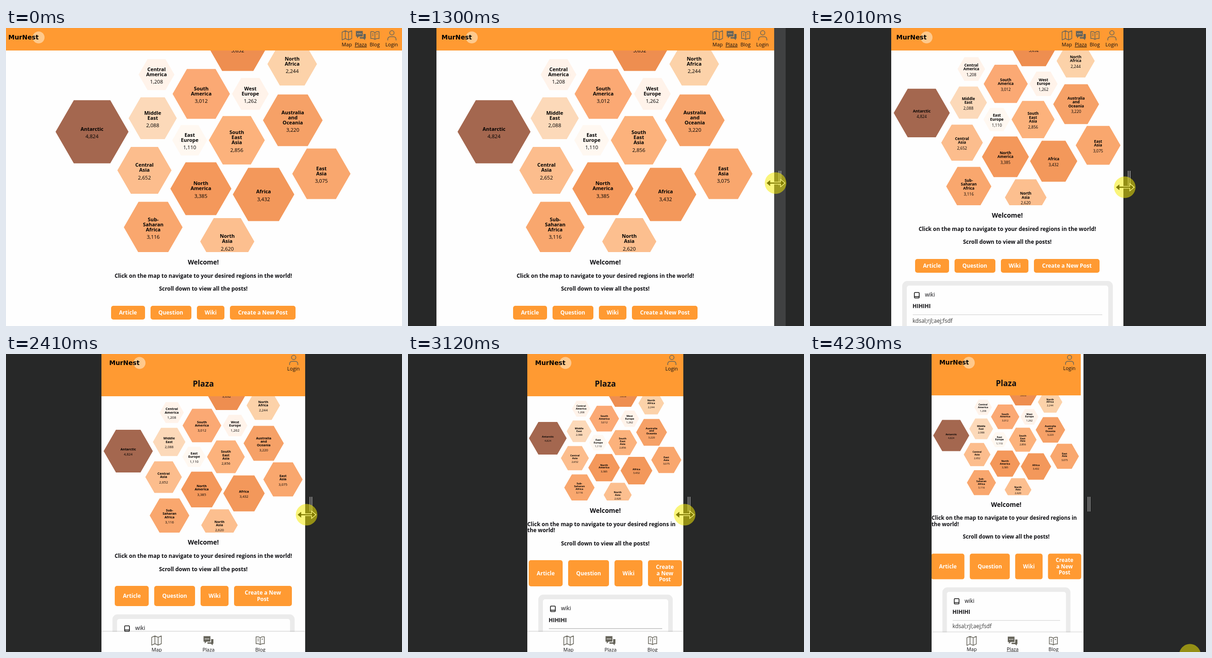
Recreate the animation shown at these times as an HTML page. Size 863 by 649 pixels, loop 4.33 s.

```html
<!DOCTYPE html>
<html lang="en">
<head>
<meta charset="utf-8">
<title>Responsive page resize</title>
<style>
  html, body { margin: 0; width: 100%; height: 100%; overflow: hidden; background: #272828; }
  #stage { position: relative; width: 863px; height: 649px; overflow: hidden; background: #272828;
    font: 12px/13.5px "Open Sans", "Noto Sans", sans-serif; color: #0c0c10; }
  #page { position: absolute; top: 0; height: 649px; overflow: hidden; background: #fefefe; }
  #view { position: absolute; left: 0; top: 0; transform-origin: 0 0; }
  header { position: absolute; left: 0; top: 0; width: 100%; background: #ff9a32; --dots: #ffb56a; }
  .logo { position: absolute; overflow: visible; }
  .logo text { font: bold 13.8px "DejaVu Sans", sans-serif; }
  .title { position: absolute; top: 52px; width: 100%; text-align: center; font-weight: 700; font-size: 17.5px; line-height: 24px; }
  .item { position: absolute; width: 40px; margin-left: -20px; text-align: center; font-size: 10.8px; line-height: 14px; }
  .item svg { display: block; margin: 0 auto .5px; fill: none; stroke: #66645a; stroke-width: 1.5; stroke-linejoin: round; }
  .item .solid { fill: #66645a; stroke: none; }
  .item .dots { fill: var(--dots); stroke: none; }
  .item u { text-underline-offset: 1px; }
  #map { position: absolute; left: 0; overflow: hidden; }
  #map text { text-anchor: middle; font-size: 11.2px; }
  #map .name { font-weight: 700; font-size: 10.9px; }
  #content { position: absolute; left: 0; width: 100%; display: flex; flex-direction: column; align-items: center; }
  #content p { margin: 0; font-weight: 700; font-size: 11.88px; }
  #content .welcome { font-size: 14px; line-height: 20px; margin: 11.5px 0 13px; }
  .buttons { width: 100%; box-sizing: border-box; padding: 0 29.25px; margin-top: 30px;
    display: flex; justify-content: center; gap: 12px; }
  .buttons div { display: grid; place-items: center; text-align: center; padding: 8.25px 17.4px; border-radius: 5px;
    background: #ff9a32; color: #fff; font-weight: 700; font-size: 11.88px; }
  .card { align-self: stretch; margin: 18px 23.5px 0; border: 11.5px solid #ebebeb; border-radius: 11px;
    height: 200px; position: relative; }
  .card::before { content: ""; position: absolute; inset: -1px; border-radius: 5px; background: #fefefe; box-shadow: 0 0 0 5px #ebebeb; }
  .card > * { position: absolute; left: 12px; white-space: nowrap; }
  .card hr { right: 12px; top: 62px; margin: 0; border: 0; height: 1.5px; background: #ccc; }
  #tabs { position: absolute; left: 0; bottom: 0; height: 44px; background: #fefefe; box-shadow: 0 -1px 3px #0003; --dots: #fff; }
  #over { position: absolute; left: 0; top: 0; }
</style>
</head>
<body>
<div id="stage">
  <div id="page"><div id="view">
    <svg id="map"><g id="cells"></g></svg>
    <div id="content">
      <p class="welcome">Welcome!</p>
      <p>Click on the map to navigate to your desired regions in the world!</p>
      <p style="margin-top:15px">Scroll down to view all the posts!</p>
      <div class="buttons"><div>Article</div><div>Question</div><div>Wiki</div><div>Create a New Post</div></div>
      <div class="card">
        <svg style="left:14px;top:13px" width="14" height="14" fill="none" stroke="#111" stroke-width="1.6">
          <rect x="1.5" y="1" width="10.5" height="12" rx="1.5"/><path d="M2 10h10"/></svg>
        <span style="left:39px;top:12px">wiki</span>
        <b style="top:37.5px">HIHIHI</b>
        <hr>
        <span style="top:69px;color:#333">kdsal;rjl;aej;fsdf</span>
      </div>
    </div>
    <header>
      <svg class="logo" width="90" height="40"><circle cx="66" cy="20.5" r="13" fill="#ffc98c"/><text y="25">MurNest</text></svg>
      <div class="title">Plaza</div>
    </header>
    <div id="tabs"></div>
  </div></div>
  <svg id="over" width="863" height="649">
    <g id="handle">
      <rect id="strip" width="25" height="649" fill="#404142"/>
      <path d="M10.5 311v32M14.5 311v32" stroke="#a9a9a9" stroke-width="1.6"/>
    </g>
    <g id="cursor">
      <path id="resize" d="M-20.5 0l9.5-8v6h22v-6l9.5 8-9.5 8v-6h-22v6z" fill="#000" stroke="#fff" stroke-width="1.4"/>
      <path id="pointer" d="M0 0v17l4-4 3 7 3-1-3-7h6z" fill="#fff" stroke="#000"/>
      <circle id="glow" r="23.5" fill="#f8ee04" fill-opacity=".52"/>
    </g>
  </svg>
</div>
<script>
const $ = id => document.getElementById(id);
const LOOP = 4330, HEIGHT = 649, CENTER = 430;
const BREAKPOINT = 500, MAP_WIDTH = 658, MIN_WIDTH = 338;

// name, post count, centre x, centre y, width, fill
const REGIONS = [
  ["Antarctic", "4,824", -242.5, 177, 159, "#a4674f"],
  ["Central/America", "1,208", -102, 52.5, 78, "#fff3ea"],
  ["South/America", "3,012", -4.5, 94.5, 125, "#fba974"],
  ["West/Europe", "1,262", 102.5, 94.5, 80, "#fff3ea"],
  ["North/Africa", "2,244", 193.7, 29.5, 108, "#fcd2a9"],
  ["", "3,632", 75, -14.5, 136, "#ee8e50"],
  ["Middle/East", "2,088", -110.3, 147.5, 105, "#fcd9b9"],
  ["Australia/and/Oceania", "3,220", 195, 152, 130, "#f6a167"],
  ["East/Europe", "1,110", -29.7, 195.5, 76, "#fff8f1"],
  ["South/East/Asia", "2,856", 73, 195.5, 122, "#fcb27c"],
  ["Central/Asia", "2,652", -128.3, 261, 118, "#fcbd8d"],
  ["North/America", "3,385", -5.3, 301, 133, "#f4985b"],
  ["East/Asia", "3,075", 257.3, 268.5, 127, "#f9a76e"],
  ["Africa", "3,432", 131.3, 313.5, 134, "#f3985b"],
  ["Sub-/Saharan/Africa", "3,116", -109.2, 385, 128, "#f9a76e"],
  ["North/Asia", "2,620", 52.2, 416, 118, "#fcbf8f"]
];

const ICONS = {
  Map: '<path d="M1.5 5l7-3 7 3 7-3v17l-7 3-7-3-7 3zM8.5 2v17M15.5 5v17"/>',
  Plaza: '<path class="solid" d="M1.5 2.5h15v12H8l-4 4v-4H1.5zM18 9h5v10h-1.5v3.5l-4-3.5H10v-3h8z"/>' +
    '<path class="dots" d="M4.5 7.5h2v2h-2zM8 7.5h2v2h-2zM11.5 7.5h2v2h-2z"/>',
  Blog: '<path d="M12 6q-4-3-9-2v15q5-1 9 2 4-3 9-2V4q-5-1-9 2v15M6 9h3M6 12.5h3M15 9h3"/>',
  Login: '<circle cx="12" cy="6.5" r="4.7"/><path d="M3 23v-2q0-6 6-6h6q6 0 6 6v2"/>'
};

function addItem(parent, label) {
  const item = document.createElement("div");
  item.className = "item";
  item.innerHTML = `<svg width="24" height="24">${ICONS[label]}</svg>` + (label === "Plaza" ? `<u>${label}</u>` : label);
  parent.append(item);
  return item;
}

function regionMarkup([name, count, x, y, width, fill]) {
  const r = width / 2, h = r * Math.sqrt(3) / 2;
  const lines = name.split("/"), n = lines.length;
  const text = (s, dy, cls) => `<text class="${cls}" y="${dy + 3.9}">${s}</text>`;
  return `<g transform="translate(${x} ${y})">` +
    `<path fill="${fill}" d="M${-r} 0L${-r / 2} ${-h}H${r / 2}L${r} 0L${r / 2} ${h}H${-r / 2}z"/>` +
    lines.map((s, i) => text(s, 11 * i - 5.5 * n - 0.5, "name")).join("") +
    text(count, name ? 5.5 * n + 5 : 15, "") + "</g>";
}

$("cells").innerHTML = REGIONS.map(regionMarkup).join("");
const header = document.querySelector("header");
const logo = header.querySelector(".logo");
const title = header.querySelector(".title");
const links = ["Map", "Plaza", "Blog"].map(s => addItem(header, s));
const login = addItem(header, "Login");
const tabs = ["Map", "Plaza", "Blog"].map(s => addItem($("tabs"), s));

// time, left edge of the page
const DRAG = [
  [0, -6], [400, -5.5], [500, -5], [600, -4], [700, -3], [800, -1], [900, 4], [1000, 12], [1100, 23],
  [1200, 40], [1300, 62], [1400, 90], [1500, 108], [1600, 124], [1710, 140], [1810, 153], [1910, 166],
  [2010, 177], [2110, 186], [2210, 194], [2310, 201], [2410, 208], [2510, 217], [2610, 226],
  [2710, 236], [2810, 246], [2910, 252], [3010, 256], [3110, 260], [3220, 263], [3320, 264.5]
];
// time, pointer x, pointer y
const LEAVE = [[3830, 612, 358], [3930, 640, 387], [4030, 700, 455], [4130, 772, 560], [4230, 828, 655]];

const at = (steps, t) => steps.filter(s => s[0] <= t).pop();
const show = (el, on) => { el.style.display = on ? "" : "none"; };

function layoutPage(left) {
  const width = 2 * (CENTER - left);
  const zoom = Math.min(1, width / MIN_WIDTH);
  const full = width / zoom;
  const body = zoom < 1 ? width + 1 : width;
  const narrow = width <= BREAKPOINT;
  const top = narrow ? 92 : 48.5;
  const scale = Math.min(1, body / MAP_WIDTH);
  const mapHeight = 439.5 * scale;

  Object.assign($("page").style, { left: left + "px", width: width + "px" });
  Object.assign($("view").style, { width: body + "px", height: HEIGHT / zoom + "px", transform: `scale(${zoom})` });
  header.style.height = top + "px";
  Object.assign(logo.style, { left: (narrow ? 17 : 11) + "px", top: (narrow ? -1 : 0) + "px" });
  show(title, narrow);
  links.forEach((link, i) => {
    show(link, !narrow);
    Object.assign(link.style, { left: body - 123.3 + 30.4 * i + "px", top: "4px" });
  });
  Object.assign(login.style, { left: body - 25.5 + "px", top: (narrow ? 0.5 : 4) + "px" });

  const map = $("map");
  map.style.top = top + "px";
  map.setAttribute("width", body);
  map.setAttribute("height", mapHeight);
  $("cells").setAttribute("transform", `translate(${body / 2} 0) scale(${scale})`);
  $("content").style.top = top + mapHeight + "px";

  show($("tabs"), narrow);
  $("tabs").style.width = full + "px";
  const spacing = Math.min(full / 4 + 6.5, full * 0.19 + 28.6);
  tabs.forEach((tab, i) => {
    Object.assign(tab.style, { left: full / 2 + 11.3 + (i - 1) * spacing + "px", top: "7px" });
  });
}

function layoutCursor(t, left) {
  const right = 2 * CENTER - left;
  const leaving = t >= 3830;
  let x = right + (t < 3320 ? 3 : t < 3520 ? 5 : 6);
  let y = Math.min(350, 334 + left * 0.06 + Math.max(0, left - 140) * 0.06);
  if (leaving) [, x, y] = at(LEAVE, t);
  $("handle").setAttribute("transform", `translate(${right} 0)`);
  $("cursor").setAttribute("transform", `translate(${x} ${y})`);
  show($("strip"), t < 1500 || (t >= 3620 && t < 3830));
  show($("cursor"), t >= 300);
  show($("resize"), !leaving);
  show($("pointer"), leaving);
  show($("glow"), t < 3520 || leaving);
}

let lastLeft = null;
function render() {
  const t = performance.now() % LOOP;
  const left = at(DRAG, t)[1];
  if (left !== lastLeft) layoutPage(lastLeft = left);
  layoutCursor(t, left);
  requestAnimationFrame(render);
}
render();
</script>
</body>
</html>
```
